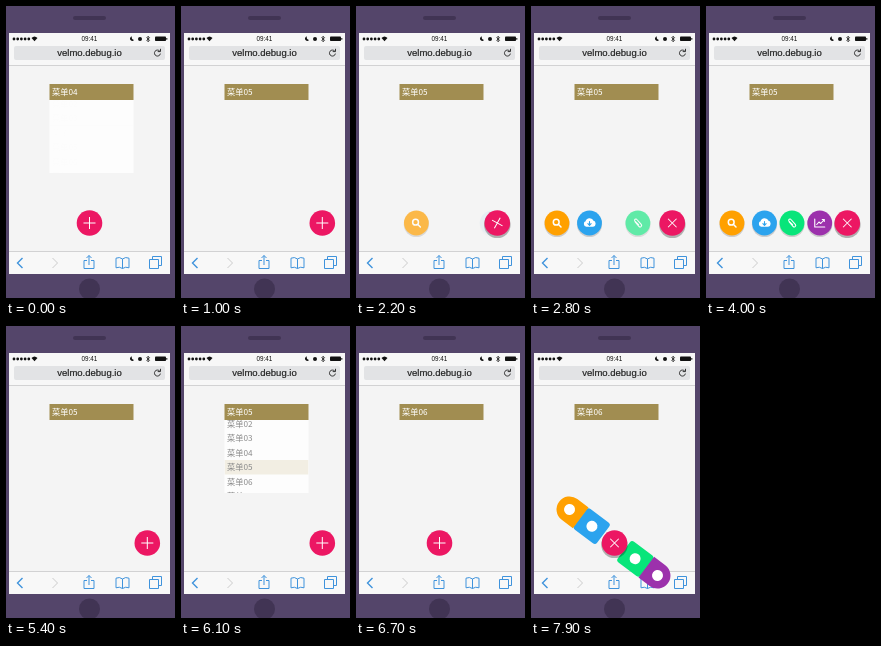
An HTML page for the animation above (8000 ms loop, 169 by 292 pixels).

```html
<!DOCTYPE html>
<html lang="zh">
<head>
<meta charset="utf-8">
<style>
  html, body { margin: 0; height: 100%; overflow: hidden; background: #54456a; }
  svg { display: block; width: 100vw; height: 100vh; }
  text { font-family: "Noto Sans CJK SC", "Noto Sans CJK", sans-serif; font-size: 8.2px; }
  .ui { font-family: "Liberation Sans", Arial, sans-serif; text-anchor: middle; }
  .line { fill: none; stroke: #3f93dc; stroke-width: 1; }
  .icon { fill: none; stroke: #fff; stroke-width: 1.5; stroke-linejoin: round; stroke-linecap: round; }
</style>
</head>
<body>
<svg viewBox="0 0 169 292" preserveAspectRatio="none">
  <defs><clipPath id="clip"><rect x="43.5" y="94" width="84" height="73"/></clipPath></defs>

  <!-- phone -->
  <rect width="169" height="292" fill="#54456a"/>
  <rect x="67" y="10" width="33" height="4" rx="2" fill="#413454"/>
  <circle cx="83.5" cy="283" r="10.5" fill="#413454"/>
  <rect x="3" y="27" width="161" height="241" fill="#f4f4f4"/>
  <rect x="3" y="27" width="161" height="32" fill="#f7f7f7"/>
  <path d="M3 59.5H164M3 245.5H164" stroke="#c9c9cb" stroke-width=".8"/>
  <rect x="3" y="246" width="161" height="22" fill="#f8f8f8"/>

  <!-- status and address bars -->
  <g fill="#111">
    <path d="M8 33h15" stroke="#111" stroke-width="2.8" stroke-linecap="round" stroke-dasharray="0 3.7"/>
    <path d="M25.5 32q3-3 6 0l-3 3.3z"/>
    <text class="ui" x="83.5" y="35" style="font-size:6.3px">09:41</text>
    <path d="M126 30.5a2.2 2.2 0 1 0 2 3.4a2.3 2.3 0 0 1-2-3.4z"/>
    <circle cx="134" cy="33" r="2"/>
    <path d="M140.5 31.3l3 3-1.5 1.5v-5.6l1.5 1.5-3 3" fill="none" stroke="#111" stroke-width=".8"/>
    <rect x="149" y="30.5" width="11" height="4.6" rx=".8"/>
    <rect x="160.3" y="32" width="1" height="1.7"/>
  </g>
  <rect x="8" y="40" width="151" height="14" rx="2" fill="#e2e3e5"/>
  <text class="ui" x="83.5" y="50" fill="#222" stroke="#222" stroke-width=".2" style="font-size:9.5px">velmo.debug.io</text>
  <path d="M153.8 45.2a3 3 0 1 0 .6 2.4M154.5 42.8v2.8h-2.8" fill="none" stroke="#333" stroke-width="1"/>

  <!-- toolbar -->
  <g class="line">
    <path d="M16.5 252l-5 5 5 5" stroke-width="1.4"/>
    <path d="M46.5 252l5 5-5 5" stroke="#ccc" style="stroke:#ccc"/>
    <path d="M81 254.5h-3v8h10v-8h-3M83 259v-9.5M80.5 252l2.5-2.5 2.5 2.5"/>
    <path d="M116.5 253q-3-2.5-6.5-.8v9.6q3.500-1.500 6.500.7q3-2.200 6.500-.7v-9.600q-3.500-1.700-6.500.8v9.500"/>
    <path d="M143.500 253.500h9v9h-9zM146.500 253.500v-3h9v9h-3"/>
  </g>

  <!-- dropdown -->
  <g id="panel">
    <rect x="43.500" y="94" width="84" height="73" fill="#fdfdfd"/>
    <g id="list" clip-path="url(#clip)"></g>
  </g>
  <rect x="43.500" y="78" width="84" height="16" fill="#a18d51"/>
  <text id="title" x="46" y="89" fill="#fff"></text>

  <g id="row"></g>
  <g id="bar"></g>
  <g id="button">
    <circle id="shade" cy="1.800" r="13.300" fill="#000"/>
    <circle r="12.800" fill="#ec1763"/>
    <path id="cross" d="M-6 0H6M0-6V6" stroke="#fff" stroke-width="1"/>
  </g>
</svg>
<script>
const $ = id => document.getElementById(id);
const clamp = x => Math.max(0, Math.min(1, x));
const ramp = (t, start, length) => clamp((t - start) / length);
const ease = p => p * p * (3 - 2 * p);
const ROW = 14.5, LOOP = 8000;

const items = [
  [26, '#ffa000', '<path d="M1.800 1.800L4 4"/><circle cx="-.8" cy="-.8" r="2.900"/>'],
  [58.500, '#2ba3ee', '<path d="M-3 3a2.200 2.200 0 0 1-.3-4.300a3.600 3.600 0 0 1 6.800-.4a2.400 2.400 0 0 1 0 4.700z" fill="#fff"/><path d="M0-1.500v3.500M-1.600.7L0 2.300 1.600.7" stroke="#2ba3ee" stroke-width="1.100"/>'],
  [86, '#08e57a', '<path d="M-2.800-1L1 3.400a1.500 1.500 0 0 0 2.300-2L-1-3.500a1.200 1.200 0 0 0-2 1.600L.6 1.600" stroke-width="1.100"/>'],
  [113.700, '#9c31ac', '<path d="M-5-4V4H5M-3 1.500L-.8-1 1 .5 4.500-3.500M2.500-3.500h2v2" stroke-width="1.100"/>']
];
$('row').innerHTML = items.map(([, color, icon]) =>
  `<g><circle cy="1.500" r="12.600" opacity=".16"/><circle r="12.400" fill="${color}"/><g class="icon">${icon}</g></g>`).join('');

// Two half capsules, one on each side of the button
const half = (inner, outer, turn) => `<g transform="rotate(${turn})">
  <rect x="13" y="-13" width="28.500" height="26" rx="3" fill="${inner}"/>
  <path d="M41-13H55a13 13 0 0 1 0 26H41z" fill="${outer}"/>
  <circle cx="27" r="5.500" fill="#fff"/><circle cx="55" r="5.500" fill="#fff"/></g>`;
$('bar').innerHTML = half(items[1][1], items[0][1], 180) + half(items[2][1], items[3][1], 0);

const label = n => '菜单0' + n;
$('list').innerHTML = '<rect id="hover" x="43.500" width="84" height="14.500" fill="#eee9da"/>' +
  [2, 3, 4, 5, 6, 7].map(n => `<text x="46" y="${rowTop(n) + 10.300}" fill="#666">${label(n)}</text>`).join('');

function rowTop(n) { return 134 + (n - 5) * ROW; }

function draw(t) {
  const late = t >= 6700, middle = t >= 1000 && !late;
  $('title').textContent = label(late ? 6 : middle ? 5 : 4);

  const open = t < 1000 || (t >= 5800 && !late);
  $('panel').style.display = open ? '' : 'none';
  $('list').setAttribute('opacity', ramp(t, t < 1000 ? 0 : 5800, 400));
  $('hover').setAttribute('y', rowTop(t < 400 ? 4 : t < 6400 ? 5 : 6));

  const home = middle ? 141.300 : 83.500;
  items.forEach(([x], i) => {
    const p = ramp(t, 1850 + 320 * i, 500) - ramp(t, 4900 - 300 * i, 500);
    const g = $('row').children[i];
    g.setAttribute('transform', `translate(${141.300 + (x - 141.300) * p} 217)`);
    g.setAttribute('opacity', p);
  });

  const grow = ease(ramp(t, 7200, 500));
  const angle = 36.900 * ramp(t, 7300, 600) ** 1.500;
  $('bar').setAttribute('transform', `translate(82.500 216.500) rotate(${angle}) scale(${grow})`);
  $('bar').setAttribute('opacity', grow);

  const turn = ease(ramp(t, 1900, 500)) - ease(ramp(t, 4000, 500)) + ease(ramp(t, 7200, 400));
  const lift = ramp(t, 1400, 300) - ramp(t, 5000, 400) + ramp(t, 7200, 300);
  $('button').setAttribute('transform', `translate(${home} 217)`);
  $('cross').setAttribute('transform', `rotate(${45 * turn})`);
  $('shade').setAttribute('opacity', .28 * lift);
}

function tick(now) {
  draw(now % LOOP);
  requestAnimationFrame(tick);
}
draw(0);
requestAnimationFrame(tick);
</script>
</body>
</html>
```
